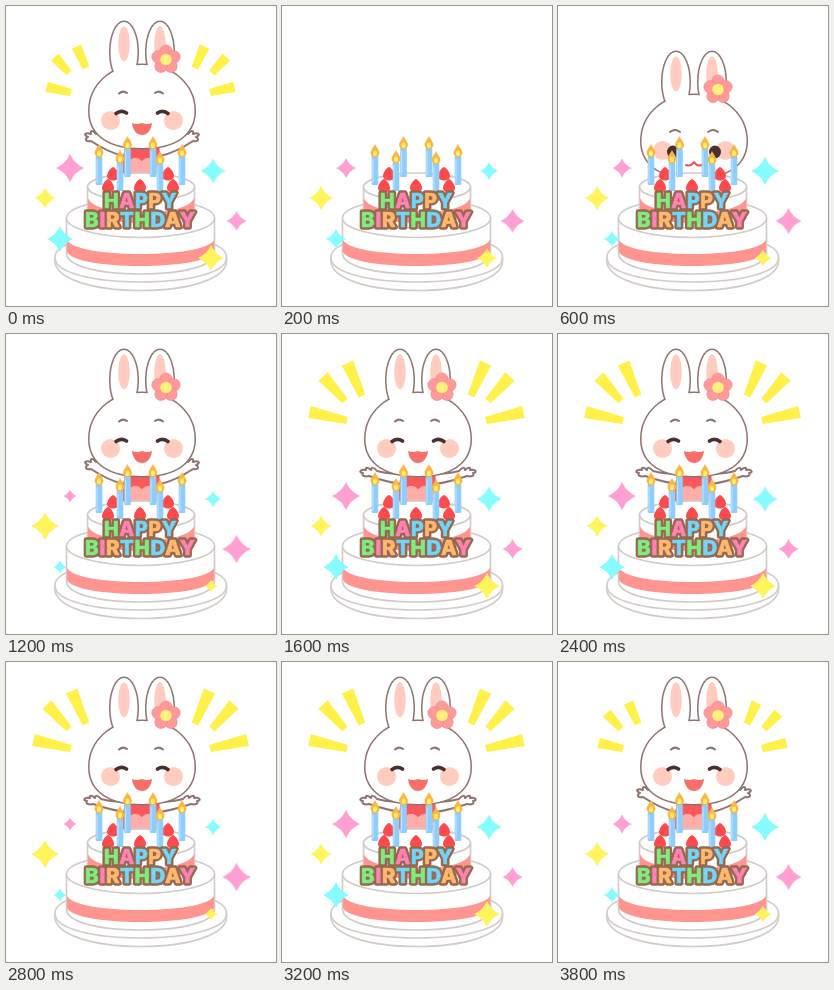
An HTML page that plays this animation: 270 by 300 pixels, repeating every 4 s.

```html
<!DOCTYPE html>
<html lang="en">
<head>
<meta charset="utf-8">
<title>Happy Birthday</title>
<style>
html, body { margin: 0; width: 100%; height: 100%; overflow: hidden; background: #fff; }
svg { display: block; width: 100vw; height: 100vh; }
.line { stroke: #8f7370; stroke-width: 2; stroke-linejoin: round; stroke-linecap: round; }
.cake .line { stroke: #d3cbc8; stroke-width: 1.7; }
.white { fill: #fff; }
.none { fill: none; }
.red { fill: #fb4b4e; }
.pink { fill: #ff9490; }
.blush { fill: #ffccbf; }
.eye { fill: none; stroke: #4b3030; stroke-width: 3.6; stroke-linecap: round; }
.ray { fill: #fff04a; }

.bunny, .calm, .happy, .up, .wide, .in, .out { animation: 4s step-end infinite; }
.bunny { animation-name: pop; }
.calm { animation-name: calm; }
.happy { animation-name: happy; }
.up { animation-name: up; }
.wide { animation-name: wide; }
.in { animation-name: in; }
.out { animation-name: out; }
.star { animation: twinkle .8s step-end infinite; }

/* hide, peek out from behind the cake, then stand */
@keyframes pop {
  0% { transform: none; opacity: 1; }
  5% { transform: translateY(80px); opacity: 0; }
  10% { transform: translateY(76px); opacity: 1; }
  15% { transform: translateY(30px); opacity: 1; }
  20%, 100% { transform: none; opacity: 1; }
}
@keyframes calm { 0%, 25% { opacity: 0; } 5% { opacity: 1; } }
@keyframes happy { 0%, 25% { opacity: 1; } 5% { opacity: 0; } }
@keyframes up {
  0%, 30%, 45%, 55%, 65%, 75%, 85%, 95% { opacity: 1; }
  5%, 40%, 50%, 60%, 70%, 80%, 90% { opacity: 0; }
}
@keyframes wide {
  0%, 30%, 45%, 55%, 65%, 75%, 85%, 95% { opacity: 0; }
  25%, 40%, 50%, 60%, 70%, 80%, 90% { opacity: 1; }
}
@keyframes in {
  0%, 35%, 45%, 55%, 65%, 75%, 85%, 95% { opacity: 1; }
  5%, 40%, 50%, 60%, 70%, 80%, 90% { opacity: 0; }
}
@keyframes out {
  0%, 45%, 55%, 65%, 75%, 85%, 95% { opacity: 0; }
  40%, 50%, 60%, 70%, 80%, 90% { opacity: 1; }
}
@keyframes twinkle {
  0% { transform: scale(var(--a)); }
  25% { transform: scale(var(--b)); }
  50% { transform: scale(var(--c)); }
  75% { transform: scale(var(--d)); }
}
text { font-family: Inter, Arial, sans-serif; font-weight: 800; letter-spacing: .7px; text-anchor: middle; }
.edge { fill: #96684e; stroke: #96684e; stroke-width: 5.4; stroke-linejoin: round; }
.fill { stroke-width: .6; stroke-linejoin: round; }
</style>
</head>
<body>
<svg viewBox="0 0 270 300">
  <defs>
    <path id="armUp" class="line white" d="M119 139 C110 139 101 135 95 130 C95 126 93 123 91 125 L90 128 C87 124 84 124 85 128 C79 126 77 129 82 131 C78 133 80 136 85 135 C94 141 104 147 118 150"/>
    <path id="armWide" class="line white" d="M121 140 C110 140 102 139 95 137 C92 133 89 133 89 136 C86 133 83 133 84 136 C77 135 77 139 81 139 C79 142 83 143 87 142 C96 145 106 148 118 150"/>
    <g id="outline">
      <path d="M136 59 C167 59 188.500 79 188.500 105 C188.500 130 167 142 136 142 C105 142 83.500 130 83.500 105 C83.500 79 105 59 136 59Z"/>
      <ellipse cx="118" cy="46" rx="13.500" ry="30"/>
      <ellipse cx="154" cy="46" rx="13.500" ry="30"/>
    </g>
    <g id="candle">
      <rect x="-3.300" y="5" width="6.600" height="29" rx="1" fill="#8fcdfc"/>
      <path d="M-2 8 V32" stroke="#b9e2ff" stroke-width="1.2"/>
      <path d="M0 -7 C2 -3 4.400 -1 4.400 2 A4.400 4.200 0 0 1 -4.400 2 C-4.400 -1 -2 -3 0 -7Z" fill="#fbb545"/>
      <ellipse cy="2.200" rx="2" ry="2.800" fill="#fff06a"/>
    </g>
    <path id="berry" class="red" d="M0 -7 C3 -6 6 -1 6 2 C6 5 3 6.500 0 6.500 C-3 6.500 -6 5 -6 2 C-6 -1 -3 -6 0 -7Z"/>
    <path id="spark" d="M0 -1 Q.3 -.3 1 0 Q.3 .3 0 1 Q-.3 .3 -1 0 Q-.3 -.3 0 -1Z"/>
  </defs>

  <g id="rays"></g>

  <g class="bunny">
    <g class="up"><use href="#armUp"/><use href="#armUp" transform="matrix(-1 0 0 1 272 0)"/></g>
    <g class="wide"><use href="#armWide"/><use href="#armWide" transform="matrix(-1 0 0 1 272 0)"/></g>
    <path fill="#f9585c" d="M119 138 H153 L157 180 H113Z"/>
    <path fill="#ffada8" d="M120 158 Q128 147 136 155 Q144 147 152 158 V180 H120Z"/>
    <use href="#outline" class="line white" style="stroke-width:3"/>
    <use href="#outline" class="white"/>
    <ellipse class="blush" cx="118" cy="38" rx="5.800" ry="17.500"/>
    <ellipse class="blush" cx="154" cy="38" rx="5.800" ry="17.500"/>
    <circle class="blush" cx="104.500" cy="114.500" r="9.500"/>
    <circle class="blush" cx="167.500" cy="114.500" r="9.500"/>
    <g class="happy">
      <path class="line none" d="M113 87.500 Q117 84 121 87 M149 87 Q153 84 157 87.500"/>
      <path class="eye" d="M110 107.500 Q115 103.500 120.500 107 M151.500 107 Q157 103.500 162 107.500"/>
      <path d="M126 117 Q131 119 136 117 Q141 119 146 117 C145 125 141 129 136 129 C131 129 127 125 126 117Z" fill="#f66f6b"/>
    </g>
    <g class="calm">
      <path class="line none" d="M112 96 Q117 92 122 96 M150 96 Q155 92 160 96"/>
      <ellipse cx="115" cy="116" rx="6" ry="6.500" fill="#4b3030"/>
      <ellipse cx="157" cy="116" rx="6" ry="6.500" fill="#4b3030"/>
      <path class="line none" style="stroke:#f0525a" d="M128 129 Q133 131 136 126 Q139 131 144 129"/>
    </g>
    <g id="flower" transform="translate(160 53.500)"></g>
  </g>

  <g class="cake">
    <path class="line white" d="M49 251 C49 237 85 228 135 228 C185 228 220.500 237 220.500 251 V255 C220.500 272 185 284.500 135 284.500 C85 284.500 49 272 49 255Z"/>
    <path class="line none" d="M49 252 C49 266 85 276 135 276 C185 276 220.500 266 220.500 252"/>
    <path class="line white" d="M60.500 212 V247 C60.500 260 92 268 134.500 268 C177 268 208.500 260 208.500 247 V212Z"/>
    <path class="pink" d="M61 234 C66 243 98 248 134.500 248 C171 248 203 243 208 234 V246 C203 255 171 260 134.500 260 C98 260 66 255 61 246Z"/>
    <ellipse class="line white" cx="134.500" cy="212" rx="74" ry="19.500"/>
    <path class="line white" d="M81.500 181 V205 C81.500 215 104 222 135 222 C166 222 188.500 215 188.500 205 V181Z"/>
    <path class="pink" d="M82 192 C85 201 107 207 135 207 C163 207 185 201 188 192 V203 C185 212 163 217 135 217 C107 217 85 212 82 203Z"/>
    <ellipse class="line white" cx="135" cy="181" rx="53.500" ry="14"/>
    <g id="toppings"></g>
    <g id="words"></g>
  </g>

  <g id="stars"></g>
</svg>
<script>
const put = (id, html) => { document.getElementById(id).innerHTML = html; };

// Each ray tapers inward; reach sets how far it extends from its inner end.
function ray([x1, y1, x2, y2], reach) {
  const len = Math.hypot(x2 - x1, y2 - y1);
  const nx = (y1 - y2) / len, ny = (x2 - x1) / len;
  const ox = x2 + (x1 - x2) * reach, oy = y2 + (y1 - y2) * reach;
  const at = (x, y, w) => `${x + nx * w},${y + ny * w}`;
  const outer = 3.5 + 2.7 * reach;
  return `<polygon class="ray" points="${at(ox, oy, outer)} ${at(ox, oy, -outer)} ${at(x2, y2, -3.5)} ${at(x2, y2, 3.5)}"/>`;
}
const rays = [[65.5, 29, 80, 62], [41, 42.5, 63, 67], [27.5, 78, 65, 86.5]];
function fan(name, reach) {
  const side = rays.map(r => ray(r, reach)).join('');
  return `<g class="${name}">${side}<g transform="matrix(-1 0 0 1 269 0)">${side}</g></g>`;
}
put('rays', fan('in', .65) + fan('out', 1));

put('flower', [0, 1, 2, 3, 4].map(i =>
  `<ellipse cy="-8.3" rx="6.2" ry="6.3" fill="#ff9a9a" stroke="#f58388" stroke-width=".6" transform="rotate(${i * 72})"/>`).join('') +
  '<circle r="5.8" fill="#fff07a"/>');

const place = (id, spots) => spots.map(([x, y]) => `<use href="#${id}" x="${x}" y="${y}"/>`).join('');
put('toppings',
  place('candle', [[121.5, 137], [147, 137]]) +
  place('berry', [[107, 168], [162, 168]]) +
  place('candle', [[93, 145], [176, 145]]) +
  place('berry', [[102, 180], [134, 180], [167, 180]]) +
  place('candle', [[114, 151], [154, 152]]));

const ink = { b: '#72d6fb', p: '#ff82b4', o: '#ffb870', g: '#80ec80' };
function word(text, y, size, hues) {
  const letters = [...text].map((c, i) => {
    const hue = ink[hues[i]];
    return `<tspan fill="${hue}" stroke="${hue}">${c}</tspan>`;
  }).join('');
  const spot = `x="134.5" y="${y}" font-size="${size}"`;
  return [`<text class="edge" ${spot}>${text}</text>`, `<text class="fill" ${spot}>${letters}</text>`];
}
const [happy, birthday] = [word('HAPPY', 202, 19.5, 'gpbob'), word('BIRTHDAY', 221, 20.4, 'gpobgbop')];
put('words', happy[0] + birthday[0] + happy[1] + birthday[1]);

// x, y, colour, then the radius at each quarter of the twinkle
const stars = [
  [64, 162, '#ff9fd2', 14, 10, 6.5, 9.5],
  [39, 192, '#fff45c', 10.5, 12, 14, 12],
  [207, 165, '#86fcff', 12.5, 9, 8, 14],
  [230.5, 215, '#ff9fd2', 10, 12, 14.3, 13],
  [54, 233, '#86fcff', 13, 10, 6.5, 8],
  [205, 252, '#fff45c', 13, 10, 6.5, 8.5]
];
put('stars', stars.map(([x, y, hue, a, b, c, d]) =>
  `<g transform="translate(${x} ${y})"><use class="star" href="#spark" fill="${hue}" style="--a:${a};--b:${b};--c:${c};--d:${d}"/></g>`).join(''));
</script>
</body>
</html>
```
